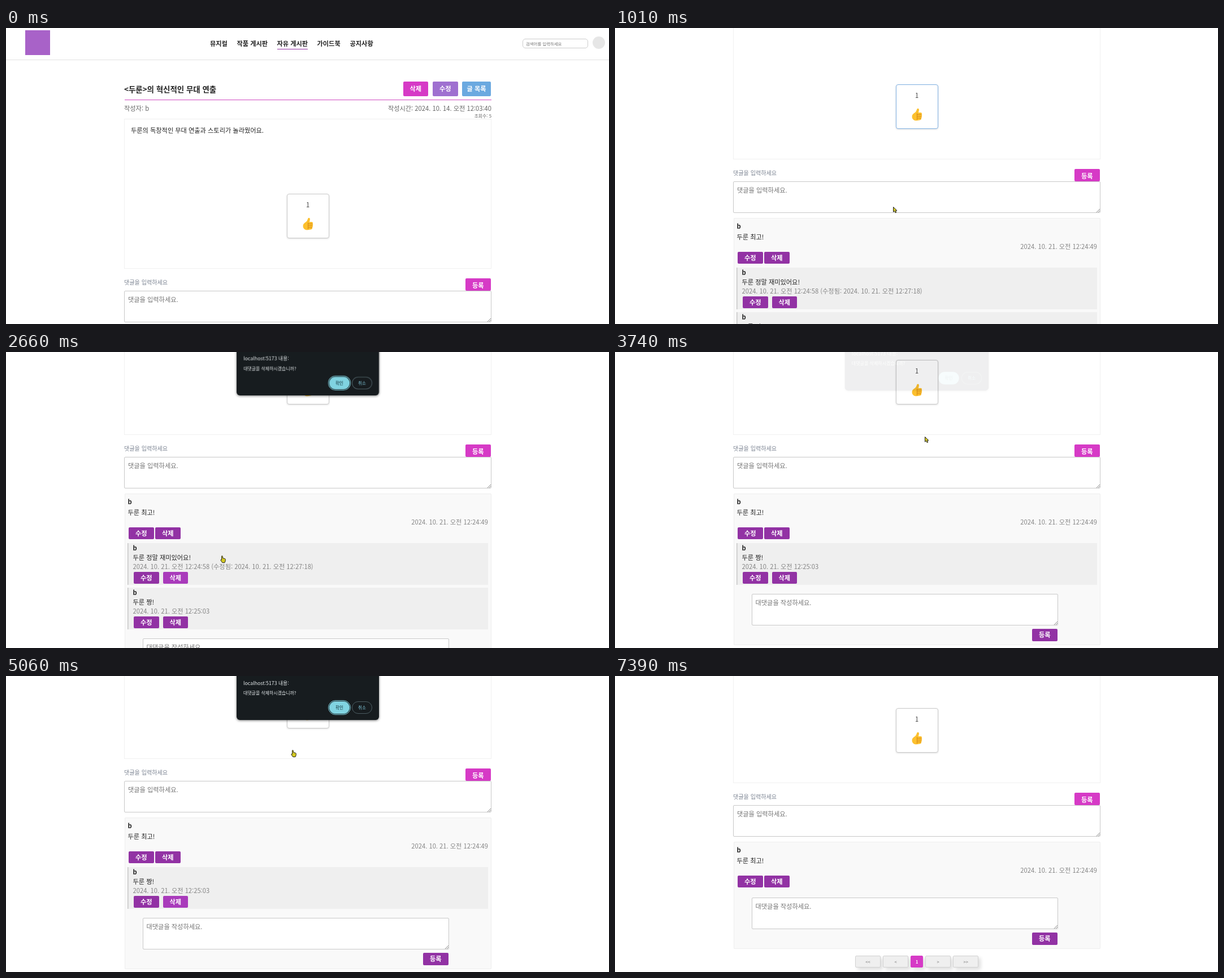
Write an HTML page that moves like this. It is 1067x525 px and loops after 7930 ms.

```html
<!DOCTYPE html>
<html lang="ko">
<head>
<meta charset="utf-8">
<title>자유 게시판</title>
<style>
  html, body { margin: 0; width: 100%; height: 100%; overflow: hidden; background: #fff; }
  body { position: relative; color: #222; font: 11.2px/20px "Noto Sans CJK KR", "Noto Sans KR", "Noto Sans CJK", sans-serif; }
  body * { box-sizing: border-box; }
  i, b, .abs { position: absolute; font-style: normal; white-space: nowrap; }
  .gray { color: #858585; }
  .anim, .page, .slot, .dialog, .card, .mouse { animation: 7930ms step-end infinite; }

  .page { position: absolute; left: 0; top: 0; width: 1067px; height: 900px; animation-name: scroll; }
  .header { left: 0; top: 0; width: 100%; height: 57px; border-bottom: 1px solid #e2e2e2; }
  .header b { top: 17px; }
  .logo { left: 34px; top: 4px; width: 44px; height: 44px; background: #a862c8; }
  .search { left: 913.5px; top: 18.5px; width: 116px; height: 17.5px; border: 1px solid #ccc; border-radius: 5px; padding-left: 5.5px; font-size: 7.4px; line-height: 15px; color: #757575; }
  .avatar { left: 1038px; top: 15px; width: 22px; height: 22px; border-radius: 50%; background: #e6e6e6; }

  .btn { position: absolute; width: 44.5px; height: 21.5px; border-radius: 2px; background: #9232a4; color: #fff; font-weight: 700; line-height: 21.5px; text-align: center; white-space: nowrap; }
  .top { top: 95px; height: 25.5px; line-height: 25px; }
  .pink { background: #d63ac6; }
  .area { position: absolute; height: 56px; background: #fff; border: 1px solid #c8c8c8; border-radius: 2px; padding: 4px 6px; color: #757575; }
  .area::after { content: ""; position: absolute; right: 0; bottom: 0; width: 6px; height: 6px; background: linear-gradient(135deg, transparent 46%, #888 46% 56%, transparent 56% 72%, #888 72% 82%, transparent 82%); }

  .card { left: 496.5px; top: 293.5px; width: 75px; height: 79.5px; border: 1.5px solid #c9c9c9; border-radius: 4px; background: #fff; box-shadow: 0 1px 3px #0002; animation-name: focus; }
  .list { left: 209.5px; top: 531px; width: 649px; }
  .thread { position: relative; padding-top: 88px; background: #f9f9f9; box-shadow: inset 0 0 0 1px #eee; border-radius: 2px; }
  .slot { position: relative; height: 79px; overflow: hidden; }
  .reply { left: 5.5px; top: 0; width: 638px; height: 73.5px; background: #efefef; box-shadow: inset 1.5px 0 #c8c8c8; }
  .reply > i, .reply > b { left: 9.5px; }
  .reply .btn { top: 50.5px; left: 11px; }
  .reply .del { left: 62.5px; }
  .form { position: relative; height: 102px; }
  .pages { display: flex; gap: 4.2px; margin: 11.5px 0 0 215.5px; }
  .pages span { width: 45px; height: 21.5px; background: #efefef; border: 1px solid #d2d2d2; border-radius: 2px; box-shadow: 4px 4px 6px #0002; font-size: 7.6px; line-height: 20px; text-align: center; color: #777; }
  .pages .on { width: 21.5px; background: #d63ac6; border-color: #d63ac6; color: #fff; font-weight: 700; }

  .dialog { left: 408px; top: -20px; width: 252px; height: 98px; border-radius: 6px; background: #171c1f; color: #e3e8ea; box-shadow: 0 1px 4px #0008; transform-origin: 50% 100%; opacity: 0; animation-name: dialog; }
  .dialog i { left: 12px; }
  .pill { position: absolute; top: 65px; width: 36px; height: 22px; border-radius: 11px; font-size: 7.6px; line-height: 21px; text-align: center; }
  .ok { left: 164px; background: #80d3e1; color: #12363e; outline: 1.4px solid #80d3e1; outline-offset: 1.2px; animation-name: ring; }
  .no { left: 204px; border: 1px solid #4c5c62; line-height: 19px; color: #80c8dc; }

  .mouse { left: 0; top: 0; width: 0; height: 0; animation-name: mouse; }
  .mouse svg { position: absolute; overflow: visible; fill: #d4c922; stroke: #222; stroke-width: 1; stroke-linejoin: round; }
  .arrow { animation-name: arrow; }
  .hand { opacity: 0; animation-name: hand; }

  @keyframes scroll {
    0% { transform: none; }
    10.97% { transform: translateY(-43px); }
    11.85% { transform: translateY(-116px); }
    12.74% { transform: translateY(-194px); }
    13.62% { transform: translateY(-245px); }
    14.5% { transform: translateY(-271px); }
    15.38% { transform: translateY(-280px); }
    76.04%, 100% { transform: translateY(-237px); }
  }
  @keyframes focus {
    7.57% { border-color: #7fb0e2; }
    13.62% { border-color: #c9c9c9; }
  }
  @keyframes gone1 { 46.28%, 100% { height: 0; } }
  @keyframes gone2 { 76.04%, 100% { height: 0; } }
  @keyframes hover1 { 27.36% { background: #a93bbb; } 46.28% { background: #9232a4; } }
  @keyframes hover2 { 59.39% { background: #a93bbb; } 75.16% { background: #9232a4; } }
  @keyframes dialog {
    0% { opacity: 0; }
    31.78%, 62.04% { opacity: .5; transform: translateY(-8px); }
    32.66%, 62.93% { opacity: .95; transform: translateY(-3px); }
    33.54% { opacity: 1; transform: translateY(-1px); }
    34.43%, 63.81% { opacity: 1; transform: none; }
    46.28%, 76.04% { opacity: .8; transform: translateY(-5px) scale(1.005); }
    47.16%, 76.92% { opacity: .07; transform: translateY(-9.5px) scale(1.01); }
    48.05%, 77.8%, 100% { opacity: 0; transform: none; }
  }
  @keyframes ring {
    46.28%, 76.04% { outline-color: transparent; }
    48.05%, 77.8% { outline-color: #80d3e1; }
  }
  @keyframes arrow {
    27.36%, 59.39% { opacity: 0; }
    39.2%, 66.46% { opacity: 1; }
  }
  @keyframes hand {
    27.36%, 59.39% { opacity: 1; }
    39.2%, 66.46% { opacity: 0; }
  }
  @keyframes mouse {
    0% { transform: translate(1080px, 545px); }
    1.64% { transform: translate(1035px, 515px); animation-timing-function: steps(8); }
    8.83% { transform: translate(520px, 345px); animation-timing-function: steps(2); }
    10.97% { transform: translate(496px, 320px); animation-timing-function: steps(2); }
    12.74% { transform: translate(492px, 317px); animation-timing-function: steps(3); }
    15.38% { transform: translate(454px, 306px); }
    18.41% { transform: translate(448px, 310px); animation-timing-function: steps(5); }
    22.82% { transform: translate(380px, 350px); animation-timing-function: steps(6); }
    28.25% { transform: translate(304px, 396px); animation-timing-function: steps(2); }
    30.01% { transform: translate(302px, 395px); }
    31.78% { transform: translate(318px, 390px); animation-timing-function: steps(2); }
    33.54% { transform: translate(382px, 361px); animation-timing-function: steps(2); }
    35.31% { transform: translate(440px, 270px); animation-timing-function: steps(4); }
    39.2% { transform: translate(560px, 110px); animation-timing-function: steps(3); }
    41.87% { transform: translate(590px, 62px); animation-timing-function: steps(4); }
    45.4% { transform: translate(590px, 60px); }
    46.28% { transform: translate(578px, 102px); }
    47.16% { transform: translate(548px, 150px); animation-timing-function: steps(4); }
    50.57% { transform: translate(472px, 284px); }
    52.21% { transform: translate(462px, 291px); animation-timing-function: steps(5); }
    56.75% { transform: translate(370px, 360px); animation-timing-function: steps(4); }
    60.28% { transform: translate(303px, 396px); }
    62.04% { transform: translate(330px, 370px); }
    62.93% { transform: translate(420px, 250px); }
    63.81% { transform: translate(507px, 131px); animation-timing-function: steps(2); }
    65.57% { transform: translate(565px, 85px); animation-timing-function: steps(4); }
    69.1% { transform: translate(592px, 60px); }
    71.75% { transform: translate(593px, 61px); animation-timing-function: steps(4); }
    75.16% { transform: translate(593px, 63px); }
    76.04% { transform: translate(594px, 73px); animation-timing-function: steps(3); }
    78.69% { transform: translate(576px, 201px); }
    87.89% { transform: translate(600px, 225px); animation-timing-function: steps(6); }
    93.19%, 100% { transform: translate(1080px, 545px); }
  }
</style>
</head>
<body>
<div class="page">
  <div class="abs header">
    <div class="abs logo"></div>
    <b style="left:361px">뮤지컬</b>
    <b style="left:408.5px">작품 게시판</b>
    <b style="left:479.5px">자유 게시판</b>
    <div class="abs" style="left:479.5px;top:36.5px;width:54px;height:1.5px;background:#9232a4"></div>
    <b style="left:550.5px">가이드북</b>
    <b style="left:608.5px">공지사항</b>
    <div class="abs search">검색어를 입력하세요</div>
    <div class="abs avatar"></div>
  </div>

  <b style="left:209px;top:98px;font-size:13.44px">&lt;두룬&gt;의 혁신적인 무대 연출</b>
  <div class="btn top pink" style="left:702.5px">삭제</div>
  <div class="btn top" style="left:755px;background:#9f70d0">수정</div>
  <div class="btn top" style="left:807px;width:51px;background:#6ba9e0">글 목록</div>
  <div class="abs" style="left:209.5px;top:127px;width:649px;height:1.4px;background:#d04ac2"></div>
  <i style="left:209px;top:132px;color:#666">작성자: b</i>
  <i style="right:208px;top:132px;color:#666">작성시간: 2024. 10. 14. 오전 12:03:40</i>
  <i style="right:208px;top:145.5px;font-size:7.84px;color:#666">조회수: 5</i>
  <div class="abs" style="left:209px;top:161px;width:650px;height:266px;border:1px solid #f0f0f0"></div>
  <i style="left:221px;top:171px">두룬의 독창적인 무대 연출과 스토리가 놀라웠어요.</i>

  <div class="abs card">
    <i style="left:0;right:0;top:8.5px;text-align:center;color:#444">1</i>
    <svg class="abs" style="left:27px;top:41px" width="19" height="23" viewBox="0 0 19 23">
      <path fill="#fcc02e" d="M9.6 1.2C10.6.2 12.7.6 12.9 2.6 13 4.6 12.4 6.300 12 8H16C18 8 18.500 10.500 17.400 11.300 18.600 12.200 18.400 14 17.300 14.600 18.300 15.600 17.900 17.300 16.800 17.800 17.500 19.200 16.700 21 15 21.200L9 22.300C4 22.800.6 19.600.6 15.500.6 11.700 3 9.700 5.500 8.300 7.700 6.700 8.600 4 9.600 1.200Z"/>
      <path fill="none" stroke="#d88a16" stroke-width="1" stroke-linecap="round" d="M9.500 9.500V20.500M10 11.400H17M10 14.700H17M10 17.900H16.500"/>
    </svg>
  </div>

  <i style="left:209px;top:440.5px;font-size:10.1px;font-weight:500;color:#7d8593">댓글을 입력하세요</i>
  <div class="btn pink" style="left:813px;top:444px;line-height:25px">등록</div>
  <div class="area" style="left:209px;top:466px;width:650px">댓글을 입력하세요.</div>

  <div class="abs list">
    <div class="thread">
      <b style="left:6px;top:4.4px">b</b>
      <i style="left:6px;top:23.4px">두룬 최고!</i>
      <i class="gray" style="right:5.500px;top:40.4px">2024. 10. 21. 오전 12:24:49</i>
      <div class="btn" style="left:7.5px;top:59.5px">수정</div>
      <div class="btn" style="left:54.5px;top:59.5px">삭제</div>
      <div class="slot" style="animation-name:gone1">
        <div class="abs reply">
          <b style="top:-1.6px">b</b>
          <i style="top:14.6px">두룬 정말 재미있어요!</i>
          <i class="gray" style="top:31.4px">2024. 10. 21. 오전 12:24:58 (수정됨: 2024. 10. 21. 오전 12:27:18)</i>
          <div class="btn">수정</div>
          <div class="btn del anim" style="animation-name:hover1">삭제</div>
        </div>
      </div>
      <div class="slot" style="animation-name:gone2">
        <div class="abs reply">
          <b style="top:-1.6px">b</b>
          <i style="top:14.6px">두룬 짱!</i>
          <i class="gray" style="top:31.4px">2024. 10. 21. 오전 12:25:03</i>
          <div class="btn">수정</div>
          <div class="btn del anim" style="animation-name:hover2">삭제</div>
        </div>
      </div>
      <div class="form">
        <div class="area" style="left:32px;top:10.5px;width:542.5px">대댓글을 작성하세요.</div>
        <div class="btn" style="left:528.5px;top:73px">등록</div>
      </div>
    </div>
    <div class="pages">
      <span>&lt;&lt;</span><span>&lt;</span><span class="on">1</span><span>&gt;</span><span>&gt;&gt;</span>
    </div>
  </div>
</div>

<div class="abs dialog">
  <i style="top:23.400px;font-size:8.8px">localhost:5173 내용:</i>
  <i style="top:40px;font-size:7.95px">대댓글을 삭제하시겠습니까?</i>
  <div class="pill ok anim">확인</div>
  <div class="pill no">취소</div>
</div>

<div class="abs mouse">
  <svg class="arrow anim" width="8" height="12"><path d="M.5.5V9.300L2.600 7.500 4.200 10.800 5.800 10 4.300 6.900H7Z"/></svg>
  <svg class="hand anim" style="left:-3px" width="10" height="14"><path d="M2.500 1.200C2.800.2 4.200.3 4.300 1.300L4.500 4.500 8.300 5.500C9.300 5.900 9.500 6.500 9.400 7.500L8.800 11 8 12.500H3.700L1 8.600C.3 7.500 1.600 6.700 2.500 7.600Z"/></svg>
</div>
</body>
</html>
```
